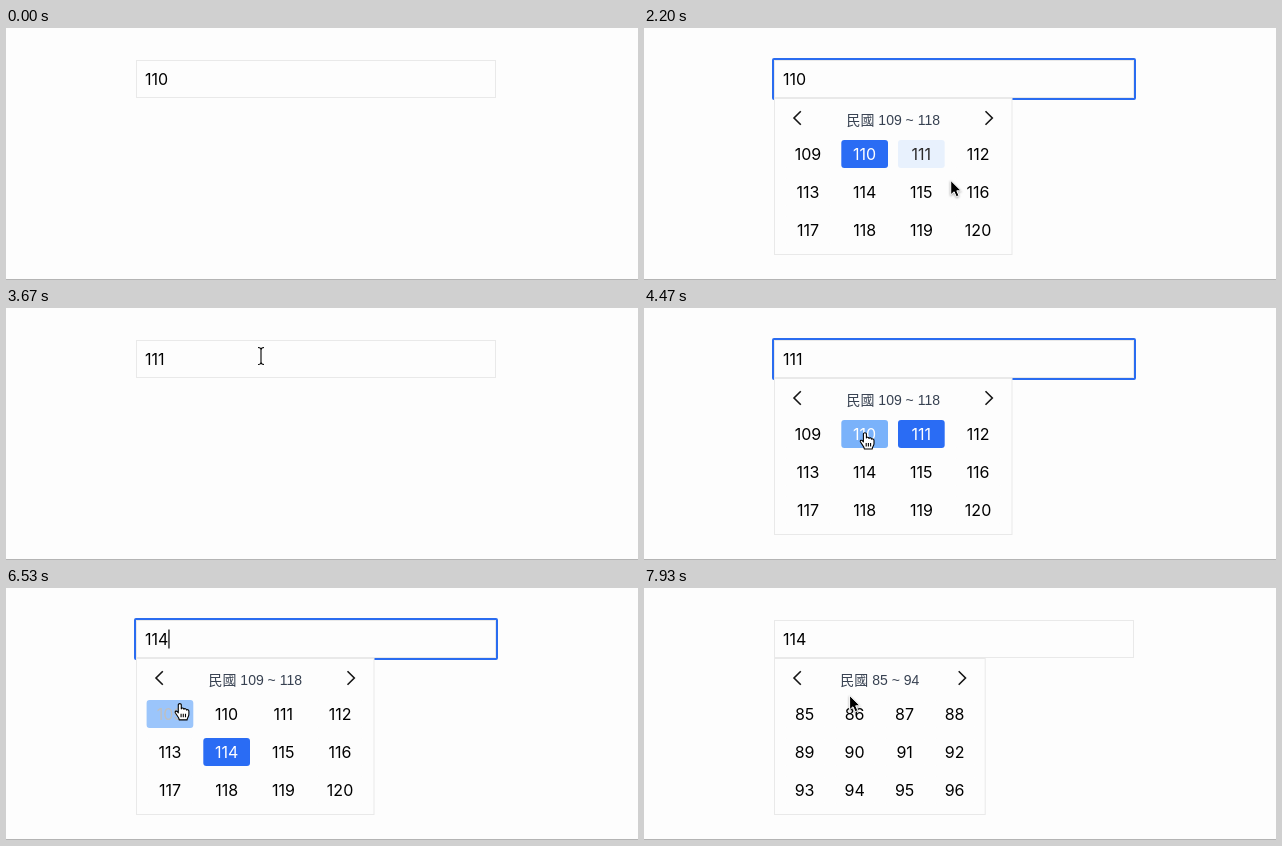
An HTML page for the animation above (8000 ms loop, 632 px wide and 252 px high).

```html
<!DOCTYPE html>
<html lang="zh-Hant">
<head>
<meta charset="utf-8">
<title>Year picker</title>
<style>
html, body { margin: 0; width: 100%; height: 100%; overflow: hidden; background: #fdfdfd; }
svg { display: block; width: 632px; height: 252px; }
text { font: 16px Inter, sans-serif; }
#title { font: 14px "Liberation Sans", "Noto Sans CJK TC", "Noto Sans CJK JP", "Noto Sans CJK", sans-serif; fill: #374151; }
.middle { text-anchor: middle; }
.box { fill: #fdfdfd; stroke: #e9e9e9; }
.chevron { fill: none; stroke: #151515; stroke-width: 1.6; }
#arrow { stroke: #fff; filter: drop-shadow(0 1px 1px #0005); }
#hand { fill: #fff; stroke: #000; stroke-width: 1.1; stroke-linejoin: round; }
#beam { fill: none; stroke: #000; stroke-width: 1.1; }
</style>
</head>
<body>
<svg viewBox="0 0 632 252">
  <rect y="251" width="632" height="1" fill="#b4b4b4"/>
  <rect class="box" x="130.5" y="32.5" width="359" height="37"/>
  <rect id="ring" x="129" y="31" width="362" height="40" rx="1" fill="none" stroke="#2a6cf0" stroke-width="2"/>
  <text id="value" x="139" y="56.8"></text>
  <rect id="caret" y="41.5" width="1.2" height="19"/>
  <g id="popup">
    <rect id="panel" class="box" x="130.5" y="70.5" height="156"/>
    <path class="chevron" d="M156.8 83.2L150 90l6.8 6.8"/>
    <path class="chevron" id="next" d="M0 83.2L6.8 90 0 96.8"/>
    <text id="title" class="middle" y="97"></text>
    <g id="cells"></g>
  </g>
  <g id="cursor">
    <path id="arrow" d="M-.4-.6V13.8L3 10.8 5.2 15.8 7.8 14.6 5.7 9.8H10Z"/>
    <path id="hand" d="M-1.6 1C-1.6-.6 1.4-.6 1.4 1V5C1.6 3.8 4 4 4 5.4 4.6 4.3 6.6 4.8 6.6 6.2 7.4 5.4 9 6 9 7.4V10.5C9 13 7.4 13.5 7.2 16H-.6C-.8 13.4-3.6 11-4.6 8.8-5.2 7.2-3.2 6.6-2.2 8.2L-1.6 9ZM1.2 10v3.4M3.4 10v3.4M5.6 10v3.4"/>
    <path id="beam" d="M-3-8.5Q0-8.5 0-6 0-8.5 3-8.5M0-6V6M-3 8.5Q0 8.5 0 6 0 8.5 3 8.5"/>
  </g>
</svg>
<script>
const LOOP = 8000, FADE = 150, BLINK = 570, SAMPLES = 12;
const $ = id => document.getElementById(id);
const show = (id, on) => $(id).setAttribute('visibility', on ? 'inherit' : 'hidden');
const set = (el, attrs) => { for (const k in attrs) el.setAttribute(k, attrs[k]); };
const add = (tag, attrs) => {
  const el = document.createElementNS('http://www.w3.org/2000/svg', tag);
  set(el, attrs);
  return $('cells').appendChild(el);
};

const cells = Array.from({ length: 12 }, () => ({
  rect: add('rect', { height: 28, rx: 3 }),
  label: add('text', { class: 'middle' })
}));

// The picker is opened three times; the value is the one held until it closes
const visits = [
  { click: 1330, blur: 2865, close: 2925, value: 110 },
  { click: 3795, blur: 5640, close: 5725, value: 111 },
  { click: 6265, blur: 6930, close: LOOP, value: 114 }
];
const backClicks = [6930, 7600];

// Each move passes its points at even steps, then the pointer rests
const outside = [770, 424], field = [228, 52], choice = [220, 156];
const moves = [
  { start: 205, length: 195, points: [[510, 213], [250, 2], [294, 71]] },
  { start: 640, length: 430, points: [[272, 44]] },
  { start: 1330, length: 200, points: [[268, 103]] },
  { start: 1930, length: 800, points: [[307, 152], [311, 183], [287, 128]] },
  { start: 2930, length: 740, points: [[255, 48]] },
  { start: 3830, length: 640, points: [[221, 125]] },
  { start: 4640, length: 560, points: [[138, 135], [262, 164], choice] },
  { start: 5670, length: 260, points: [[228, 36]] },
  { start: 6050, length: 80, points: [field] },
  { start: 6270, length: 520, points: [[174, 116], [159, 95]] },
  { start: 7600, length: 330, points: [[206, 108]] }
];

const easeOut = k => 1 - (1 - k) ** 2;
const lerp = (a, b, k) => a.map((v, i) => v + (b[i] - v) * k);

function pointer(t) {
  let from = outside;
  for (const { start, length, points } of moves) {
    if (t < start) break;
    const progress = (t - start) / length * points.length;
    const i = Math.floor(progress);
    if (i < points.length) return lerp(i ? points[i - 1] : from, points[i], easeOut(progress - i));
    from = points[points.length - 1];
  }
  return from;
}

function stateAt(t) {
  const visit = visits.find(v => t < v.close);
  const first = 109 - 12 * backClicks.filter(click => t >= click).length;
  return {
    first,
    value: visit.value,
    focusedFor: t < visit.blur ? t - visit.click : -1,
    open: t >= visit.click + 60,
    cell: first + 11 < 100 ? 40 : 46.7
  };
}

const cellCorner = (i, width) => [140.6 + i % 4 * (width + 10), 112 + 38 * Math.floor(i / 4)];
const inside = ([px, py], [x, y], w, h) => px >= x && px < x + w && py >= y && py < y + h;

// Index of the cell under the pointer, or -1
function hovered(t) {
  const { open, cell } = stateAt(t), p = pointer(t);
  return open ? cells.findIndex((_, i) => inside(p, cellCorner(i, cell), cell, 28)) : -1;
}

const mix = (a, b, k) => `rgb(${lerp(a, b, k).map(Math.round)})`;

function draw(t) {
  const s = stateAt(t), p = pointer(t);
  const width = 4 * s.cell + 50.7;
  const focused = s.focusedFor >= 0;

  $('value').textContent = s.value;
  show('ring', focused);
  show('caret', focused && Math.floor(s.focusedFor / BLINK) % 2 === 0);
  set($('caret'), { x: 139 + $('value').getComputedTextLength() });

  show('popup', s.open);
  set($('panel'), { width });
  set($('next'), { transform: `translate(${width + 104} 0)` });
  set($('title'), { x: 130.5 + width / 2 });
  $('title').textContent = `民國 ${s.first} ~ ${s.first + 9}`;

  // The share of recent time spent on a cell gives its hover fade
  const recent = Array.from({ length: SAMPLES }, (_, i) => hovered(Math.max(0, t - i * FADE / SAMPLES)));
  cells.forEach(({ rect, label }, i) => {
    const [x, y] = cellCorner(i, s.cell), year = s.first + i;
    const glow = easeOut(recent.filter(h => h === i).length / SAMPLES);
    const chosen = year === s.value;
    set(rect, { x, y, width: s.cell, fill: chosen ? '#2a6cf4' : mix([253, 253, 253], [122, 178, 250], glow) });
    set(label, { x: x + s.cell / 2, y: y + 19.8, fill: chosen ? '#fff' : mix([0, 0, 0], [255, 255, 255], glow) });
    label.textContent = year;
  });

  const onButton = s.open && (recent[0] >= 0 || inside(p, [141, 78], 26, 25));
  const onField = inside(p, [130, 32], 360, 38);
  show('hand', onButton);
  show('beam', onField && !onButton);
  show('arrow', !onField && !onButton);
  set($('cursor'), { transform: `translate(${p})` });
}

function frame(now) {
  draw(now % LOOP);
  requestAnimationFrame(frame);
}
requestAnimationFrame(frame);
</script>
</body>
</html>
```
